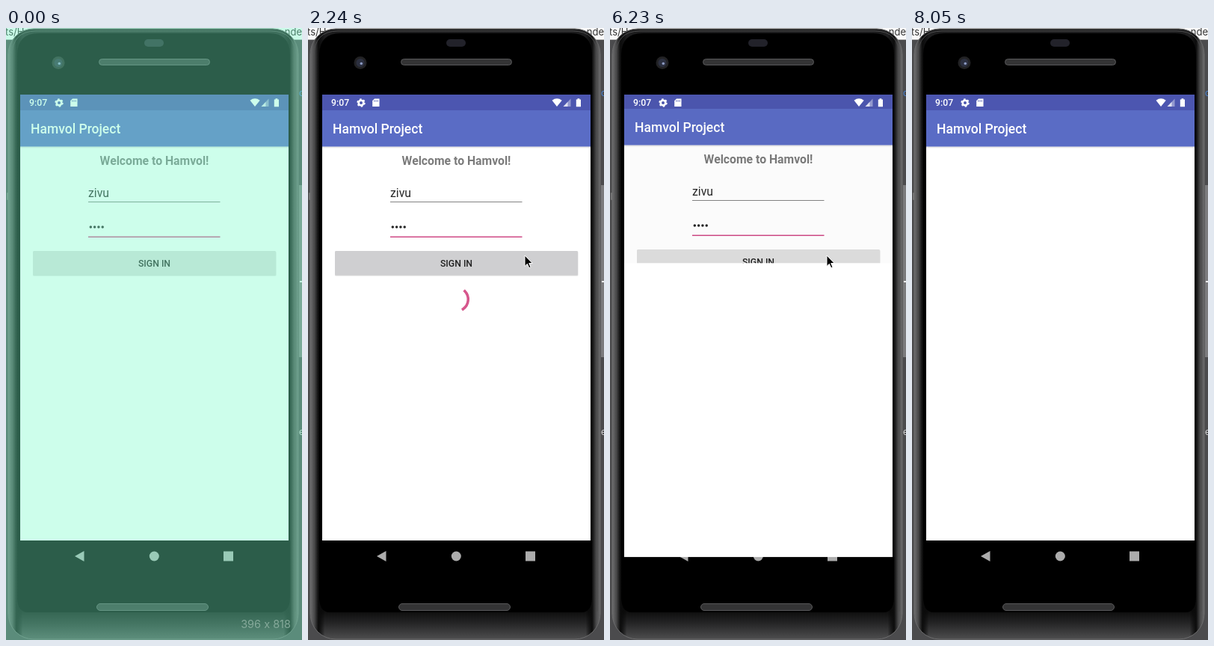
Write an HTML page that moves like this. It is 396 px wide and 818 px high and loops after 8.47 s.

```html
<!DOCTYPE html>
<html lang="en">
<head>
<meta charset="utf-8">
<title>Sign-in demo</title>
<style>
html, body { margin: 0; width: 100%; height: 100%; overflow: hidden; background: #4b4b4d; }
svg { display: block; width: 396px; height: 818px; }
text { font-family: Roboto, "Liberation Sans", sans-serif; }
.title { font-size: 17.5px; font-weight: 500; fill: #fff; }
.clock, .label { font-size: 12.25px; font-weight: 500; }
.ui { font-family: Inter, "Open Sans", sans-serif; }
</style>
</head>
<body>
<svg viewBox="0 0 396 818">
  <defs>
    <linearGradient id="shell" x2="0" y2="1">
      <stop offset="0" stop-color="#1c1c1d"/>
      <stop offset=".12" stop-color="#2b2b2c"/>
      <stop offset=".9" stop-color="#242425"/>
      <stop offset=".955" stop-color="#0e0e0e"/>
      <stop offset=".975" stop-color="#272728"/>
      <stop offset="1" stop-color="#4e4e4f"/>
    </linearGradient>
    <linearGradient id="rim">
      <stop offset="0" stop-color="#6e6e6f"/>
      <stop offset=".014" stop-color="#4a4a4b"/>
      <stop offset=".028" stop-color="#0c0c0c"/>
      <stop offset=".05" stop-color="#000" stop-opacity="0"/>
      <stop offset=".95" stop-color="#000" stop-opacity="0"/>
      <stop offset=".972" stop-color="#0c0c0c"/>
      <stop offset=".986" stop-color="#4a4a4b"/>
      <stop offset="1" stop-color="#6a6a6b"/>
    </linearGradient>
    <linearGradient id="shade" x2="0" y2="1">
      <stop offset="0" stop-color="#000" stop-opacity=".16"/>
      <stop offset="1" stop-color="#000" stop-opacity="0"/>
    </linearGradient>
    <clipPath id="screen"><rect x="19" y="89" width="359" height="638"/></clipPath>
    <clipPath id="reveal"><rect id="revealBox" x="19" y="89" width="359" height="638"/></clipPath>
    <clipPath id="buttonClip"><rect x="36" y="298" width="325" height="32.5" rx="1.5"/></clipPath>
    <g id="bar">
      <rect x="19" y="89" width="359" height="596" fill="#fff"/>
      <rect x="19" y="158.500" width="359" height="2.500" fill="url(#shade)"/>
      <rect x="19" y="89" width="359" height="21" fill="#4c56b0"/>
      <rect x="19" y="110" width="359" height="48.500" fill="#5a6cc5"/>
      <text class="title" x="33" y="141">Hamvol Project</text>
    </g>
  </defs>

  <!-- desktop behind the device -->
  <rect width="396" height="818" fill="#4b4b4d"/>
  <rect width="396" height="15" fill="#fafafa"/>
  <rect x="0" y="15" width="396" height="1" fill="#bbb"/>
  <text class="ui" x="-1" y="10" font-size="13" fill="#333">ts/H</text>
  <text class="ui" x="396" y="10" font-size="13" fill="#333" text-anchor="end">nde</text>
  <rect x="392" y="210" width="4" height="230" fill="#7b7b7d"/>
  <rect x="393" y="338" width="3" height="2" fill="#eee"/>
  <text class="ui" x="392" y="91" font-size="11" fill="#4a86d8">o</text>
  <text class="ui" x="392" y="544" font-size="11" fill="#ddd">e</text>
  <rect x="1" y="220" width="5" height="10" rx="1" fill="#777"/>

  <!-- device -->
  <rect x="3" y="1" width="388" height="816" rx="34" fill="url(#shell)"/>
  <rect x="3" y="1" width="388" height="816" rx="34" fill="url(#rim)" stroke="#6c6c6d"/>
  <path d="M15 760V36Q15 7 44 7H352Q380 7 380 36V760Q380 781 366 781H29Q15 781 15 760Z" fill="#000"/>
  <path d="M8 780V38Q8 4 40 4H354Q387 4 387 38V780" fill="none" stroke="#4c4c4d"/>
  <rect x="185" y="15" width="26" height="10" rx="5" fill="#22222a"/>
  <circle cx="70" cy="46.500" r="8.500" fill="#222224"/>
  <circle cx="70" cy="46.500" r="5.500" fill="#2c3040"/>
  <circle cx="71.300" cy="47.500" r="1.800" fill="#8b99c0"/>
  <g fill="#343435" stroke="#58585a">
    <rect x="124.500" y="41.500" width="148" height="8" rx="4"/>
    <rect x="121.500" y="769.500" width="149" height="9" rx="4.500"/>
  </g>
  <g fill="#acacac">
    <path d="M92 706L104.500 699V713Z"/>
    <circle cx="198.300" cy="706" r="6.500"/>
    <rect x="291" y="699.500" width="13" height="13"/>
  </g>

  <!-- app windows -->
  <g clip-path="url(#screen)">
    <g id="login">
      <use href="#bar"/>
      <text x="198.500" y="182.500" font-size="15.750" font-weight="700" fill="#7b7b7b" text-anchor="middle">Welcome to Hamvol!</text>
      <text x="110" y="226" font-size="15.750" fill="#262626">zivu</text>
      <path d="M110 232.500H286.500" stroke="#838383"/>
      <path fill="none" stroke="#262626" stroke-width="3.500" stroke-linecap="round" d="M113.300 266h.01M118.600 266h.01M123.900 266h.01M129.200 266h.01"/>
      <path d="M110 279.300H286.500" stroke="#cf4a86" stroke-width="1.400"/>
      <path id="caret" d="M132 255.500V276.500" stroke="#d8447f" stroke-width="1.500"/>
      <rect x="36" y="298.500" width="325.500" height="33" rx="1.500" fill="#000" opacity=".12"/>
      <rect x="36" y="298" width="325" height="32.500" rx="1.500" fill="#dedede"/>
      <g clip-path="url(#buttonClip)"><circle id="ripple" cx="290" cy="313" fill="#cfcfd1"/></g>
      <text class="label" x="198.500" y="318.700" fill="#222" text-anchor="middle">SIGN IN</text>
      <path id="spinner" fill="none" stroke="#d6568c" stroke-width="3.500" stroke-linecap="square"/>
      <rect id="dim" x="19" y="89" width="359" height="596"/>
    </g>
    <g id="next"><g clip-path="url(#reveal)"><use href="#bar"/></g></g>
  </g>

  <!-- status icons -->
  <g fill="#fff">
    <text class="clock" x="31" y="104.300">9:07</text>
    <circle cx="71" cy="100" r="3.300" fill="none" stroke="#fff" stroke-width="2.600"/>
    <circle cx="71" cy="100" r="4.900" fill="none" stroke="#fff" stroke-width="1.600" stroke-dasharray="2.560"/>
    <path d="M89 94.500H95.500V105H86.200V97.300Z"/>
    <path d="M88.800 96.500v2M91 96.500v2M93.200 96.500v2" stroke="#4c56b0"/>
    <path d="M326.500 96.700Q333 91.800 339.700 96.700L333 105Z"/>
    <path d="M341.500 105L351.500 94.500V105Z" opacity=".4"/>
    <path d="M341.500 105L347.500 98.700V105Z" opacity=".7"/>
    <path d="M358.800 95.500H360.500V94.200H363.300V95.500H365V105.200H358.800Z"/>
  </g>

  <circle id="press" cx="289" cy="305" r="22" fill="#888" opacity=".22"/>
  <path id="pointer" d="M0 0V14.500L3.400 11.300L5.800 16.700L8 15.700L5.700 10.500H10.200Z" fill="#000" stroke="#fff" stroke-width="1"/>

  <g id="tint">
    <rect width="396" height="818" fill="#79fcc8" opacity=".367"/>
    <text class="ui" x="381" y="802" font-size="14.500" fill="#86aa9b" text-anchor="end">396 x 818</text>
  </g>
</svg>
<script>
const LOOP = 8470, STEP = 70;
const SPIN_START = 2035, SPIN_END = 5950, TRIM = 1364, TURN = 2274;
const OPEN = 6090, OPEN_TIME = 660, WINDOW = 638;

const pointerPath = [[420, 262, 822], [910, 284, 342], [1120, 290, 304], [7840, 290, 304], [7910, 284, 400], [7980, 258, 634]];

const el = {};
document.querySelectorAll("svg [id]").forEach(n => el[n.id] = n);

const clamp = v => Math.max(0, Math.min(1, v));
const show = (node, on) => node.setAttribute("visibility", on ? "visible" : "hidden");
const move = (node, x, y) => node.setAttribute("transform", `translate(${x} ${y})`);

// Linear lookup in rows of [time, ...values]
function track(rows, t) {
  let i = 0;
  while (i < rows.length - 2 && t >= rows[i + 1][0]) i++;
  const [a, b] = [rows[i], rows[i + 1]];
  const k = clamp((t - a[0]) / (b[0] - a[0]));
  return a.slice(1).map((v, j) => v + (b[j + 1] - v) * k);
}

// y at x on one cubic segment
function bezier(x, x0, y0, x1, y1, x2, y2, x3, y3) {
  if (x <= x0) return y0;
  if (x >= x3) return y3;
  const at = (p, a, b, c, d) => {
    const q = 1 - p;
    return q * q * q * a + 3 * q * q * p * b + 3 * q * p * p * c + p * p * p * d;
  };
  let lo = 0, hi = 1;
  for (let i = 0; i < 24; i++) {
    const mid = (lo + hi) / 2;
    if (at(mid, x0, x1, x2, x3) < x) lo = mid; else hi = mid;
  }
  return at(lo, y0, y1, y2, y3);
}
const standard = x => bezier(x, 0, 0, .4, 0, .2, 1, 1, 1);
const extraSlow = x => x < 1 / 6
  ? bezier(x, 0, 0, .05, 0, .1333, .06, .16667, .4)
  : bezier(x, .16667, .4, .20833, .82, .25, 1, 1, 1);
const trimHead = u => bezier(u, 0, 0, .2, 0, .1, 1, .5, 1);
const trimTail = u => bezier(u, .5, 0, .7, 0, .6, 1, 1, 1);

function arc(from, to) {
  const point = deg => {
    const a = deg * Math.PI / 180;
    return `${198.5 + 15.75 * Math.sin(a)} ${362.7 - 15.75 * Math.cos(a)}`;
  };
  const end = Math.max(to, from + .5);
  return `M${point(from)}A15.75 15.75 0 ${end - from > 180 ? 1 : 0} 1 ${point(end)}`;
}

function drawSpinner(t) {
  show(el.spinner, t >= SPIN_START);
  if (t < SPIN_START) return;
  const age = Math.min(t, SPIN_END) - SPIN_START;
  const u = age / TRIM % 1;
  const base = 360 * age / TURN + 90 * u;
  el.spinner.setAttribute("d", arc(base + 270 * trimTail(u), base + 270 * trimHead(u)));
}

function drawWindows(t) {
  const x = clamp((t - OPEN) / OPEN_TIME), p = standard(x);
  move(el.login, 0, -.02 * WINDOW * p);
  el.dim.setAttribute("opacity", .1 * p);
  show(el.next, t >= OPEN);
  move(el.next, 0, .041 * WINDOW * (1 - p));
  el.revealBox.setAttribute("y", 89 + WINDOW * (1 - extraSlow(x)));
}

function draw(t) {
  show(el.tint, t < STEP);
  show(el.caret, t >= 400 && t < OPEN && (t - 400) % 1000 < 500);
  show(el.press, t >= 1260 && t < 1400);
  el.ripple.setAttribute("r", t < 1820 ? 0 : 30 + 230 * clamp((t - 1820) / 280));
  el.ripple.setAttribute("opacity", 1 - clamp((t - 2310) / 280));
  show(el.pointer, t >= 420 && t < 8050);
  move(el.pointer, ...track(pointerPath, t));
  drawSpinner(t);
  drawWindows(t);
}

function tick() {
  draw(Math.floor(performance.now() % LOOP / STEP) * STEP);
  requestAnimationFrame(tick);
}
tick();
</script>
</body>
</html>
```
